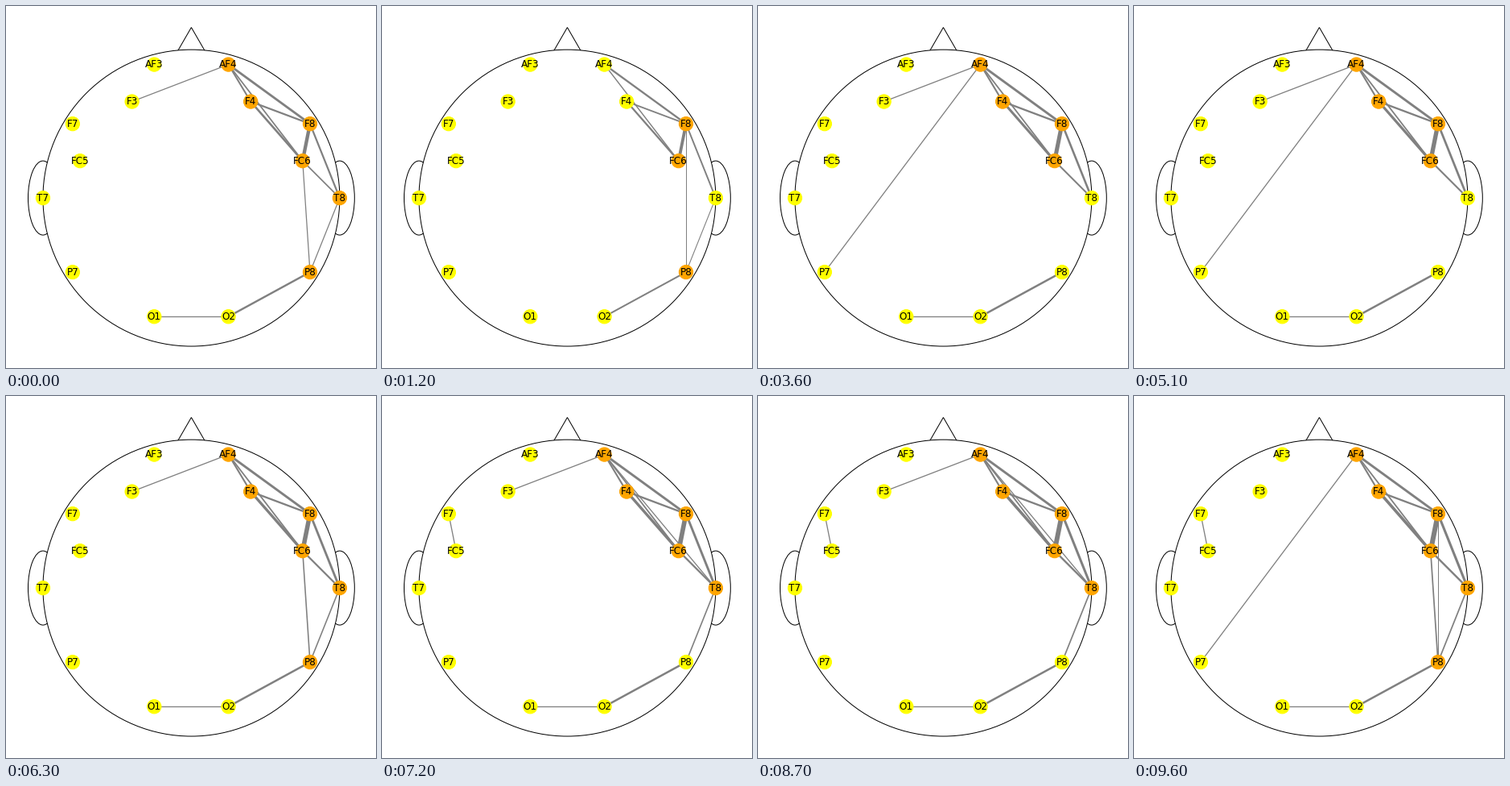
A matplotlib script that plays this animation: 460x449 px, repeating every 9.9 s.

```python
import math

import matplotlib.pyplot as plt
from matplotlib.animation import FuncAnimation
from matplotlib.collections import LineCollection
from matplotlib.patches import Circle, Ellipse, RegularPolygon

W, H, DPI = 460, 449, 72
FRAMES, STEP = 33, 300
R = 4  # head radius in data units
PAD, AX_W, AX_H = 7.2, 446.4, 435

# Left electrodes; each has a mirrored partner on the right
LEFT = {"AF3": (-1, 3.6), "F3": (-1.6, 2.6), "F7": (-3.2, 2), "FC5": (-3, 1),
        "T7": (-4, 0), "P7": (-3.2, -2), "O1": (-1, -3.2)}
SITES = dict(LEFT)
for name, (x, y) in LEFT.items():
    SITES[name[:-1] + str(int(name[-1]) // 2 * 2 + 2)] = (-x, y)

# Links that are always on, then those that come and go by scene
CORE = "AF4-F8 AF4-FC6 F4-F8 F4-FC6 F8-FC6 F8-T8 P8-O2"
FRONT = "AF4-F4 FC6-T8 O1-O2"
RIGHT = FRONT + " AF4-F3 FC6-P8 T8-P8"
CALM = "F8-P8 T8-P8"
CROSS = FRONT + " AF4-F3 AF4-P7"
LEFTWARD = FRONT + " AF4-F3 AF4-T8 F7-FC5 T8-P8"
WIDE = FRONT + " AF4-P7 F7-FC5 FC6-P8 F8-P8 T8-P8"
SCENES = [(0, RIGHT), (2, CALM), (7, CROSS), (19, RIGHT), (24, LEFTWARD), (30, WIDE)]

STRENGTH = {"AF4-F8": 2.9, "AF4-FC6": 1.8, "F4-F8": 2.3, "F4-FC6": 2.7,
            "F8-FC6": 4.5, "F8-T8": 2.3, "P8-O2": 2.5, "AF4-F4": 2.1,
            "FC6-T8": 1.8, "F8-P8": 1}
DEFAULT = 1.3
LINKS = sorted({link for _, scene in SCENES for link in (CORE + " " + scene).split()})


def width(link, i):
    """Temporal links grow over the loop; all weaken in the calm scene."""
    ends = link.split("-")
    grows = "AF4" not in ends and ("FC6" in ends or "T8" in ends)
    growth = 0.35 * i / FRAMES if grows else 0
    dip = 0.2 * math.exp(-((i - 4) / 3) ** 2) if link != "F8-P8" else 0
    return STRENGTH.get(link, DEFAULT) * (1 + growth - dip)


fig = plt.figure(figsize=(W / DPI, H / DPI), dpi=DPI, facecolor="white")
ax = fig.add_axes([PAD / W, PAD / H, AX_W / W, AX_H / H])
ax.set(xlim=(-4.84, 4.84), ylim=(-4.43, 5.03))
ax.axis("off")

# Ears and nose sit behind the head
outline = dict(facecolor="white", edgecolor="black", linewidth=1, clip_on=False)
for side in (-R, R):
    ax.add_patch(Ellipse((side, 0), 0.8, 2, zorder=0, **outline))
ax.add_patch(RegularPolygon((0, R), 3, radius=0.6, zorder=0, **outline))
ax.add_patch(Circle((0, 0), R, zorder=0.5, **outline))

lines = LineCollection([[SITES[end] for end in link.split("-")] for link in LINKS],
                       colors="gray", zorder=1)
ax.add_collection(lines, autolim=False)
nodes = ax.scatter(*zip(*SITES.values()), s=300, linewidths=1, zorder=2)
for name, (x, y) in SITES.items():
    ax.text(x, y, name, ha="center", va="center", fontsize=12,
            family="DejaVu Sans", zorder=3)


def update(i):
    scene = [links for start, links in SCENES if start <= i][-1]
    active = (CORE + " " + scene).split()
    lines.set_linewidths([width(link, i) if link in active else 0 for link in LINKS])

    # Hubs have three or more links
    ends = [end for link in active for end in link.split("-")]
    colors = ["orange" if ends.count(name) >= 3 else "yellow" for name in SITES]
    nodes.set_facecolor(colors)
    nodes.set_edgecolor(colors)
    return lines, nodes


anim = FuncAnimation(fig, update, frames=FRAMES, interval=STEP,
                     repeat=True, repeat_delay=0)
plt.show()
```
